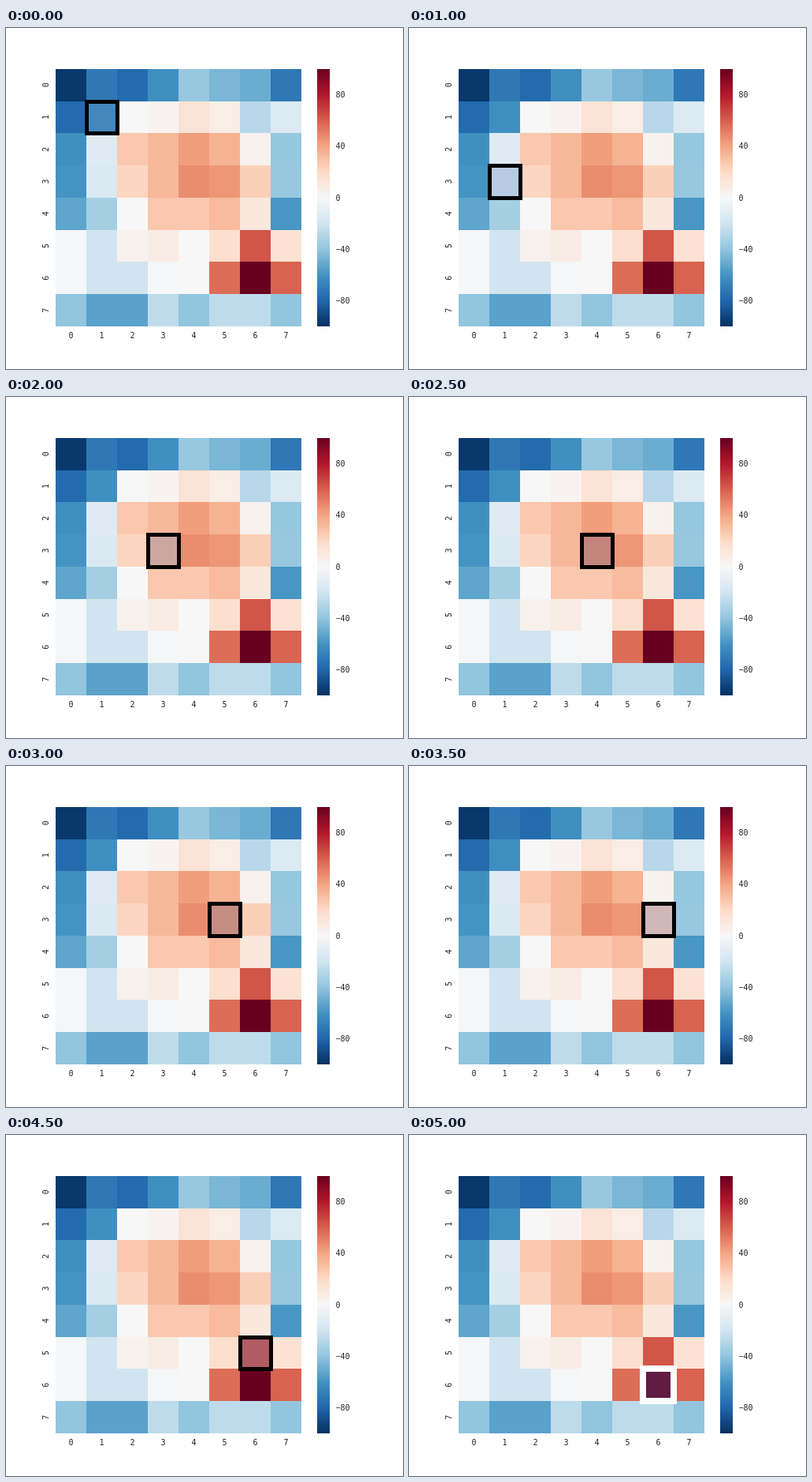
Animation, 504 px wide and 432 px high, one loop 5.5 s. Source, as an HTML page with a canvas:

```html
<!DOCTYPE html>
<html>
<head>
<meta charset="utf-8">
<style>
html, body { margin: 0; width: 504px; height: 432px; overflow: hidden; background: #fff; }
canvas { display: block; }
</style>
</head>
<body>
<canvas id="stage" width="504" height="432"></canvas>
<script>
const ctx = document.getElementById('stage').getContext('2d');

// Diverging colour scale from -100 to 100
const scale = ['053061', '2166ac', '4393c3', '92c5de', 'd1e5f0', 'f7f7f7',
  'fddbc7', 'f4a582', 'd6604d', 'b2182b', '67001f'];
const channels = hex => [0, 2, 4].map(i => parseInt(hex.slice(i, i + 2), 16));

const values = [
  [-97, -72, -78, -62, -38, -46, -50, -72],
  [-78, -62, 0, 3, 14, 7, -28, -14],
  [-62, -13, 27, 33, 42, 35, 4, -39],
  [-60, -15, 22, 33, 47, 44, 24, -38],
  [-53, -34, 0, 27, 27, 32, 11, -59],
  [-1, -20, 4, 8, 0, 17, 63, 15],
  [-1, -20, -20, -1, 0, 56, 100, 59],
  [-40, -54, -54, -26, -40, -26, -26, -40]
];

// Visited cells as row and column digits
const path = '11 21 31 32 33 34 35 36 46 56 66'.split(' ');
const stepTime = 500;

const cellX = col => 63 + 39 * col;
const edgeY = row => 51.84 + 40.77 * row;
const cellY = row => Math.round(edgeY(row));

function colorOf(value) {
  const pos = (value + 100) / 20;
  const i = Math.min(9, Math.floor(pos));
  const from = channels(scale[i]), to = channels(scale[i + 1]);
  const mix = from.map((c, k) => Math.round(c + (to[k] - c) * (pos - i)));
  return `rgb(${mix})`;
}

function drawChart() {
  ctx.fillStyle = '#fff';
  ctx.fillRect(0, 0, 504, 432);
  values.forEach((line, row) => line.forEach((value, col) => {
    ctx.fillStyle = colorOf(value);
    ctx.fillRect(cellX(col), cellY(row), 39, cellY(row + 1) - cellY(row));
  }));

  const bar = ctx.createLinearGradient(0, 378, 0, 52);
  scale.forEach((hex, i) => bar.addColorStop(i / 10, '#' + hex));
  ctx.fillStyle = bar;
  ctx.fillRect(395, 52, 16, 326);

  ctx.fillStyle = '#262626';
  ctx.font = '10px "DejaVu Sans Mono", monospace';
  ctx.textAlign = 'center';
  for (let i = 0; i < 8; i++) {
    ctx.fillText(i, cellX(i + 0.5), 393);
    ctx.save();
    ctx.translate(54, edgeY(i + 0.5));
    ctx.rotate(-Math.PI / 2);
    ctx.fillText(i, 0, 0);
    ctx.restore();
  }
  ctx.textAlign = 'left';
  for (let v = -80; v <= 80; v += 40) {
    ctx.fillText(String(v).replace('-', '\u2212'), 418.5, Math.round(214.92 - v * 1.631 + 3.6));
  }
}

function drawMarker(step) {
  const [row, col] = [...path[step]].map(Number);
  const last = step === path.length - 1;
  const shift = last ? 0 : 0.5;
  ctx.beginPath();
  ctx.rect(cellX(col) + shift, cellY(row) + shift, 39, cellY(row + 1) - cellY(row));
  ctx.fillStyle = 'rgba(76, 114, 176, 0.25)';
  ctx.fill();
  ctx.lineWidth = last ? 8 : 5;
  ctx.strokeStyle = last ? '#fff' : '#000';
  ctx.stroke();
}

const start = performance.now();
function frame() {
  const elapsed = performance.now() - start;
  drawChart();
  drawMarker(Math.floor(elapsed / stepTime) % path.length);
  requestAnimationFrame(frame);
}
frame();
</script>
</body>
</html>
```
